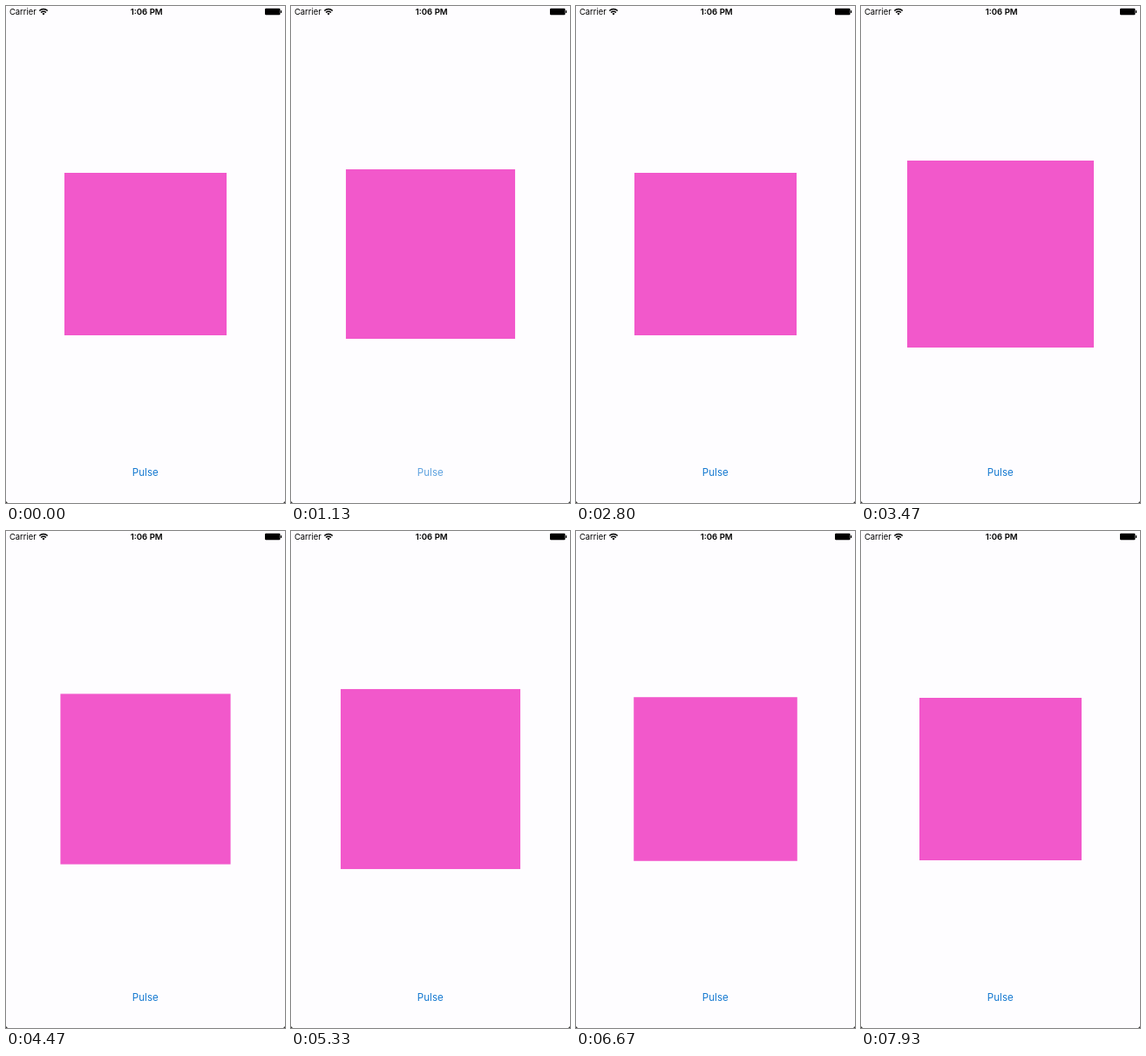
Recreate the animation shown at these times as an HTML page. Size 320x569 px, loop 8.47 s.

```html
<!DOCTYPE html>
<html lang="en">
<head>
<meta charset="utf-8">
<title>Pulse</title>
<style>
  html, body { margin: 0; height: 100%; overflow: hidden; background: #fefdff; }
  svg { display: block; width: 320px; height: 569px; font-family: Inter, Roboto, sans-serif; }
</style>
</head>
<body>
<svg viewBox="0 0 320 569">
  <text x="4" y="10.2" font-size="9.4">Carrier</text>
  <g fill="none" stroke="#000" stroke-width="1.5">
    <path d="M38.3 5.6a6.4 6.4 0 0 1 9.4 0M40.1 7.6a4 4 0 0 1 5.8 0"/>
    <path d="M43 10.4l-1.5-1.6a2 2 0 0 1 3 0z" fill="#000" stroke="none"/>
  </g>
  <text x="161.2" y="10.2" font-size="9.6" font-weight="600" text-anchor="middle">1:06 PM</text>
  <rect x="297" y="2.8" width="17.5" height="7.4" rx="1.2"/>
  <rect x="315" y="5" width="1.2" height="3" rx=".6"/>
  <rect id="box" fill="#f258cb"/>
  <text id="label" x="159.8" y="538.3" font-size="11.6" fill="#1478d0" text-anchor="middle">Pulse</text>
  <path d="M0 567v2h2zM320 567v2h-2z" fill="#333"/>
</svg>
<script>
  const LOOP = 8470, STEP = 200 / 3;
  const START = 810, HALF = 1000, PULSES = 3;
  const box = document.getElementById('box');
  const label = document.getElementById('label');
  const clamp = x => Math.min(1, Math.max(0, x));

  // cubic-bezier(.42, 0, .58, 1), solved by bisection
  function easeInOut(x) {
    let lo = 0, hi = 1, u;
    for (let i = 0; i < 24; i++) {
      u = (lo + hi) / 2;
      const at = 3 * u * (1 - u) * (0.42 * (1 - u) + 0.58 * u) + u ** 3;
      if (at < x) lo = u; else hi = u;
    }
    return u * u * (3 - 2 * u);
  }

  function scaleAt(t) {
    const p = (t - START) / HALF;
    if (p <= 0 || p >= 2 * PULSES) return 1;
    return 1 + 0.2 * easeInOut(1 - Math.abs(p % 2 - 1));
  }

  // The button dims on touch and fades back after release
  function labelAlpha(t) {
    if (t < 660) return 1;
    if (t < 870) return t < 725 ? 0.3 : 0.2;
    return 0.2 + 0.8 * easeInOut(clamp((t - 870) / 470));
  }

  function draw(now) {
    const t = Math.floor((now % LOOP + 3.5) / STEP) * STEP;
    const size = 186 * scaleAt(t);
    box.setAttribute('x', 160 - size / 2);
    box.setAttribute('y', 284 - size / 2);
    box.setAttribute('width', size);
    box.setAttribute('height', size);
    label.setAttribute('opacity', labelAlpha(t));
  }

  let begin;
  function tick(now) {
    begin ??= now;
    draw(now - begin);
    requestAnimationFrame(tick);
  }
  draw(0);
  requestAnimationFrame(tick);
</script>
</body>
</html>
```
